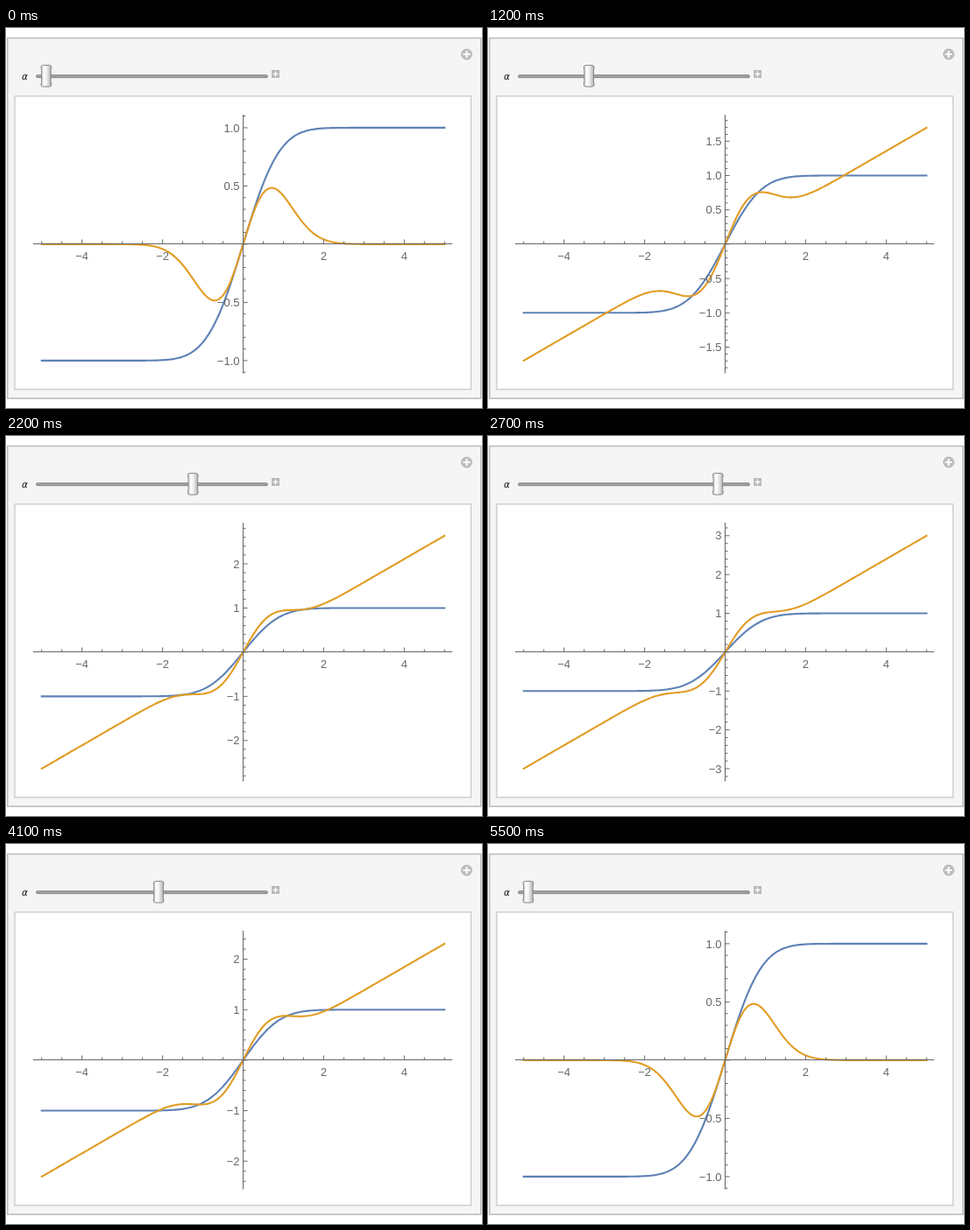
An HTML page that plays this animation: 543x434 px, repeating every 6 s.

```html
<!DOCTYPE html>
<html lang="en">
<head>
<meta charset="utf-8">
<title>Slider plot</title>
<style>
  html, body { margin: 0; width: 543px; height: 434px; overflow: hidden; background: #fff; }
  svg { display: block; }
  .curve { fill: none; stroke-width: 2.1; stroke-linejoin: round; stroke-linecap: square; }
  #axes { fill: none; stroke: #666; stroke-width: 1; }
  #labels { font: 13px "Liberation Sans", Arial, sans-serif; fill: #666; }
  #alpha { font: italic 10.5px "DejaVu Sans", sans-serif; fill: #111; }
</style>
</head>
<body>
<svg width="543" height="434" viewBox="0 0 543 434">
  <defs>
    <linearGradient id="metal">
      <stop offset="0" stop-color="#c4c4c4"/>
      <stop offset=".3" stop-color="#fff"/>
      <stop offset=".55" stop-color="#eee"/>
      <stop offset="1" stop-color="#aaa"/>
    </linearGradient>
  </defs>
  <rect id="panel" x="1.75" width="540" fill="#f5f5f5" stroke="#b9b9b9" stroke-width="1.5"/>
  <rect id="frame" x="10" width="520.5" fill="#fff" stroke="#c6c6c6" stroke-width="1.2"/>
  <g id="controls">
    <circle cx="525.5" cy="30" r="6.5" fill="#bcbcbc"/>
    <path d="M521.5 30h8M525.5 26v8" stroke="#fff" stroke-width="2"/>
    <text id="alpha" x="18" y="58.5">α</text>
    <rect x="34.5" y="53.7" width="264" height="3" rx="1.5" fill="#a2a2a2" stroke="#808080" stroke-width=".9"/>
    <rect x="303" y="48" width="9" height="9" fill="#b8b8b8"/>
    <path d="M304.5 52.5h6M307.5 49.5v6" stroke="#fff" stroke-width="1.4"/>
    <path id="knob" fill="url(#metal)" stroke="#858585" stroke-width="1"
      d="M-6-9.5Q-6-12.2-3.5-12.2H3.5Q6-12.2 6-9.5L5.3-7V7L6 9.5Q6 12.2 3.5 12.2H-3.5Q-6 12.2-6 9.5L-5.3 7V-7Z"/>
  </g>
  <path id="blue" class="curve" stroke="#5e81b5"/>
  <path id="orange" class="curve" stroke="#e19c24"/>
  <path id="axes"/>
  <g id="labels"></g>
</svg>
<script>
const $ = id => document.getElementById(id);
const CX = 270.5, UNIT_X = 45.95, TOP = 99, BOTTOM = 394.5, PEAK = 133;
const LABEL_HALF = 8;

function erf(x) {
  const z = Math.abs(x), t = 1 / (1 + 0.3275911 * z);
  const poly = t * (0.254829592 + t * (-0.284496736 + t * (1.421413741 + t * (-1.453152027 + t * 1.061405429))));
  return Math.sign(x) * (1 - poly * Math.exp(-z * z));
}

function curve(f, cy, unit) {
  let d = "";
  for (let i = 0; i <= 200; i++) {
    const x = -5 + i / 20;
    d += (i ? "L" : "M") + (CX + x * UNIT_X).toFixed(2) + " " + (cy - f(x) * unit).toFixed(2);
  }
  return d;
}

function label(text, x, y, anchor) {
  return `<text x="${x}" y="${y.toFixed(2)}" text-anchor="${anchor}">${text.replace("-", "\u2212")}</text>`;
}

function draw(step) {
  const a = step ? 0.001 + 0.0163 * (step - 1) : 0;
  const slope = Math.sqrt(a);
  const max = Math.max(1, 5 * slope), unit = PEAK / max, range = max / 0.9;
  const major = range >= 2 ? 1 : 0.5, minor = major / 5;

  // The panel grows when the outermost tick label sticks out of the plot.
  const room = (range - Math.floor(range / major) * major) * unit;
  const grow = Math.round(2 * Math.max(0, LABEL_HALF - room));
  const up = Math.floor(grow / 2), down = grow - up;
  const cy = 246.9 + (down - up) / 2, axisY = Math.floor(cy) + 0.5;

  const place = (id, y, h) => {
    $(id).setAttribute("y", y - up);
    $(id).setAttribute("height", h + grow);
  };
  place("panel", 11.5, 411.5);
  place("frame", 77.8, 335);
  $("controls").setAttribute("transform", `translate(0 ${-up})`);
  $("knob").setAttribute("transform", `translate(${45.9 + 602 * a} 54.8)`);
  $("blue").setAttribute("d", curve(erf, cy, unit));
  $("orange").setAttribute("d",
    curve(x => x * (slope + 2 / Math.sqrt(Math.PI) * Math.exp(-x * x)), cy, unit));

  let d = `M31 ${axisY}H509M${CX} ${TOP}V${BOTTOM}`, text = "";
  for (let i = -10; i <= 10; i++) {
    const x = CX + i / 2 * UNIT_X, big = i % 4 === 0;
    d += `M${x} ${axisY}v${big ? -5 : -3}`;
    if (big && i) text += label(String(i / 2), x, axisY + 18, "middle");
  }
  const last = Math.floor(range / minor);
  for (let i = -last; i <= last; i++) {
    const y = cy - i * minor * unit, big = i % 5 === 0;
    d += `M${CX} ${y}h${big ? 5 : 3}`;
    if (big && i) text += label((i * minor).toFixed(major < 1 ? 1 : 0), 266.5, y + 4.6, "end");
  }
  $("axes").setAttribute("d", d);
  $("labels").innerHTML = text;
}

let shown = -1;
function tick() {
  const s = Math.floor(performance.now() % 6000 / 100);
  const step = Math.max(0, Math.min(s - 4, 55 - s));
  if (step !== shown) draw(shown = step);
  requestAnimationFrame(tick);
}
tick();
</script>
</body>
</html>
```
